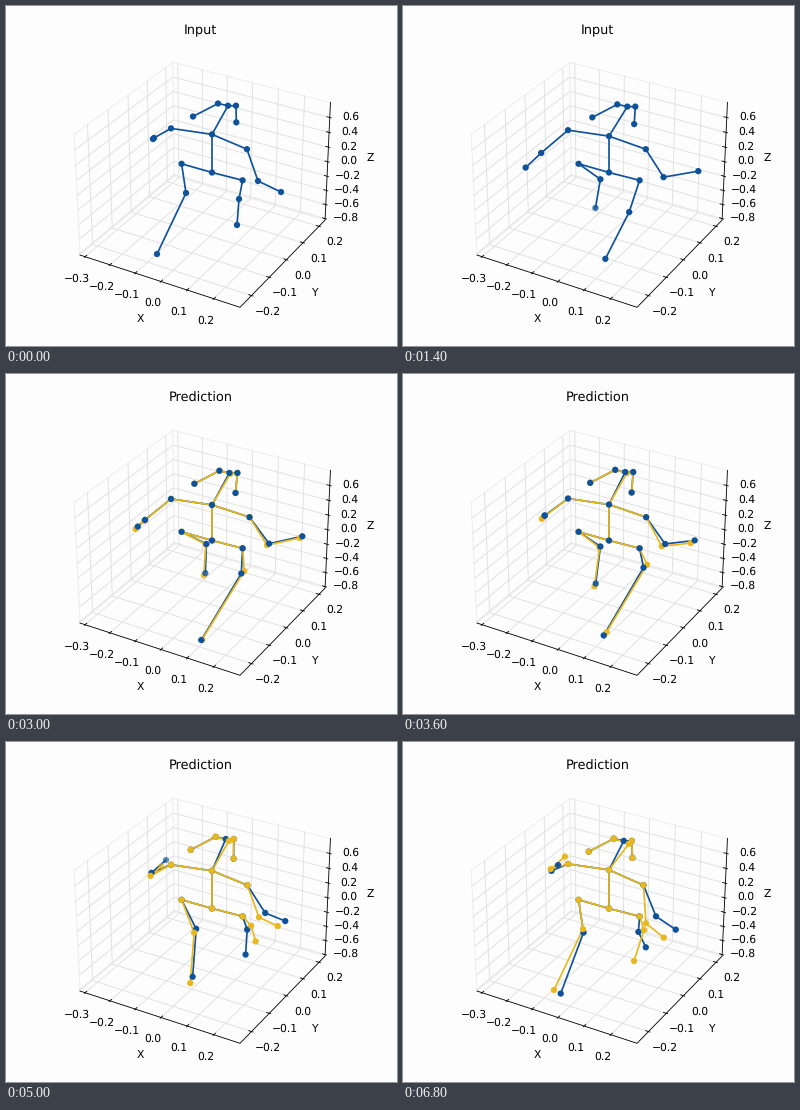
These frames come from a looping animation (391 px wide and 340 px high, 7000 ms). A matplotlib script:

```python
import numpy as np
import matplotlib.pyplot as plt
from matplotlib.animation import FuncAnimation
from matplotlib.colors import to_rgba

W, H, DPI = 391, 340, 100
PT = 72 / DPI  # points per pixel
STEP, FRAMES = 200, 35
PREDICT_AT = 2000
FRONT_SWAP = 5000  # from here the predicted joints lie in front
BG, BLUE, YELLOW = "#fdfdfd", "#0f529c", "#e8b81e"
FONT = 10.7

plt.rcParams["text.hinting"] = "no_hinting"

# Per axis: limits, tick positions
AXES = {
    "x": ((-0.3206, 0.2969), np.arange(-3, 3) / 10),
    "y": ((-0.2624, 0.2389), np.arange(-2, 3) / 10),
    "z": ((-0.821, 0.800), np.arange(-4, 4) / 5),
}

# One walking cycle: each limb joint loops through four key points
CYCLE = 7400
KEYS = np.array([0, 1900, 3700, 5800])
LIMBS = {
    "relbow": [(148, 132), (136, 150), (142, 141), (147, 127)],
    "rwrist": [(147, 133), (119, 166), (143, 140), (164, 112)],
    "lelbow": [(252, 175), (263, 170), (262, 170), (257, 172)],
    "lwrist": [(275, 186), (300, 160), (291, 167), (274, 185)],
    "rknee": [(180, 187), (202, 170), (197, 173), (186, 193)],
    "rankle": [(151, 248), (204, 191), (192, 211), (180, 246)],
    "lknee": [(233, 193), (226, 208), (241, 193), (239, 187)],
    "lankle": [(231, 219), (196, 261), (202, 260), (255, 192)],
}

# The prediction runs ahead in the legs, behind in the right arm,
# and drifts away at these joints
AHEAD = ("rknee", "rankle", "lknee", "lankle")
BEHIND = ("relbow", "rwrist")
DRIFT = {"nose": (5, 3), "lelbow": (-10, 7), "lwrist": (-12, 8),
         "lknee": (8, -5)}

CHAINS = [chain.split() for chain in (
    "rwrist relbow rshoulder neck lshoulder lelbow lwrist",
    "rankle rknee rhip root lhip lknee lankle",
    "root neck nose",
    "rear reye nose leye lear",
)]
JOINTS = list(dict.fromkeys(j for chain in CHAINS for j in chain))


def loop_path(points, t):
    """Smooth closed path through the key points, repeated every cycle."""
    keys = np.concatenate([KEYS - CYCLE, KEYS, KEYS + CYCLE]).astype(float)
    p = np.tile(np.array(points, float), (3, 1))
    slope = np.gradient(p, keys, axis=0)
    t = t % CYCLE
    i = np.searchsorted(keys, t, "right") - 1
    h = keys[i + 1] - keys[i]
    u = (t - keys[i]) / h
    return ((1 + 2 * u) * (1 - u) ** 2 * p[i]
            + u * (1 - u) ** 2 * h * slope[i]
            + u * u * (3 - 2 * u) * p[i + 1]
            + u * u * (u - 1) * h * slope[i + 1])


def wave(t, size, degrees):
    return size * np.cos(2 * np.pi * t / CYCLE - np.radians(degrees))


def observed(t):
    bob = wave(t, 1.6, 130)
    head = np.array([2 + wave(t, 2.5, 90), wave(t, 1.8, 60) - 0.9])
    pose = {
        "root": (206, 166.5), "rhip": (175.6, 157.8), "lhip": (236.6, 174.3),
        "neck": (206, 129.4 + bob),
        "rshoulder": (165, 123.4 + bob),
        "lshoulder": (242 + bob, 143.2),
        "nose": head + (220, 99.7),
        "reye": head + (210, 97.5),
        "rear": head + (185, 110.5),
        "leye": head + (228, 99.7),
        "lear": (229.4 + wave(t, 1.8, 60), 117.4 + bob),
    }
    for name, points in LIMBS.items():
        pose[name] = loop_path(points, t)
    return pose


def predicted(t):
    since = t - PREDICT_AT
    lead, growth = since / 8, since / 4800
    pose, ahead, behind = (observed(t + d) for d in (0, lead, -lead))
    pose.update({j: ahead[j] for j in AHEAD})
    pose.update({j: behind[j] for j in BEHIND})
    for name, offset in DRIFT.items():
        pose[name] = pose[name] + growth * np.array(offset)
    return pose


def project(x, y, z):
    """Perspective view of the box [-1, 1]^3, in pixels."""
    depth = 10 - 0.2577 * x + 0.4464 * y - 0.2232 * z
    right = 0.5155 * x + 0.2976 * y
    up = -0.1488 * x + 0.2577 * y + 0.3866 * z
    return np.array([198.8 + 1540 * right / depth, 173 - 1540 * up / depth])


fig = plt.figure(figsize=(W / 100, H / 100), dpi=DPI, facecolor=BG)
ax = fig.add_axes([0, 0, 1, 1])
ax.set_xlim(0, W)
ax.set_ylim(H, 0)
ax.axis("off")


def segment(*corners, color, width, z=1):
    pts = np.array([project(*c) for c in corners])
    ax.plot(pts[:, 0], pts[:, 1], color=color, lw=width * PT, zorder=z)


def label(x, y, text, size=FONT):
    return ax.text(x, y + 0.365 * size, text, fontsize=size * PT, ha="center",
                   va="baseline", family="DejaVu Sans", color="black")


def draw_box():
    edge = dict(color="#ececec", width=0.9)
    segment((-1, -1, -1), (-1, -1, 1), (-1, 1, 1), (1, 1, 1), **edge)
    segment((-1, -1, -1), (-1, 1, -1), (1, 1, -1), **edge)
    segment((-1, 1, -1), (-1, 1, 1), **edge)

    # For each axis: grid path, tick at distance d from the edge, label offset
    layout = {
        "x": (lambda p: [(p, -1, -1), (p, 1, -1), (p, 1, 1)],
              lambda p, d: (p, -1 - d, -1), (-8, 20.8)),
        "y": (lambda p: [(1, p, -1), (-1, p, -1), (-1, p, 1)],
              lambda p, d: (1 + d, p, -1), (16, 15)),
        "z": (lambda p: [(-1, -1, p), (-1, 1, p), (1, 1, p)],
              lambda p, d: (1 + d, 1, p), (20.7, -1.5)),
    }
    for name, (grid, tick, offset) in layout.items():
        (lo, hi), values = AXES[name]
        for value in values:
            p = 2 * (value - lo) / (hi - lo) - 1
            segment(*grid(p), color="#e0e0e0", width=0.9)
            segment(tick(p, -0.033), tick(p, 0.017),
                    color="black", width=0.86, z=3)
            text = f"{value:.1f}".replace("-", "\u2212")
            label(*(project(*tick(p, 0)) + offset), text)
    segment((-1, -1, -1), (1, -1, -1), (1, 1, -1), (1, 1, 1),
            color="black", width=0.86, z=2)
    label(134, 312, "X")
    label(308, 286, "Y")
    label(364, 151, "Z")


def bump(t, center, width):
    return np.exp(-((t - center) / width) ** 2)


class Skeleton:
    def __init__(self, color, z):
        self.rgba = to_rgba(color)
        self.bones = [ax.plot([], [], color=color, lw=1.7 * PT, zorder=z,
                              solid_joinstyle="round")[0] for _ in CHAINS]
        start = np.zeros(len(JOINTS))
        self.dots = ax.scatter(start, start, s=(6.3 * PT) ** 2,
                               linewidths=0, zorder=6)

    def show(self, pose, t):
        for bone, chain in zip(self.bones, CHAINS):
            bone.set_data(*np.array([pose[j] for j in chain]).T)
        self.dots.set_offsets([pose[j] for j in JOINTS])
        colors = np.tile(self.rgba, (len(JOINTS), 1))
        # Joints that swing far back look paler
        colors[JOINTS.index("rankle"), 3] -= 0.3 * bump(t, 2200, 1300)
        colors[JOINTS.index("rwrist"), 3] -= 0.4 * bump(t, 5200, 1000)
        self.dots.set_facecolor(colors)

    def set_visible(self, on):
        for artist in [*self.bones, self.dots]:
            artist.set_visible(on)


draw_box()
title = label(194.8, 23.6, "Input", size=1.2 * FONT)
truth = Skeleton(BLUE, 4)
guess = Skeleton(YELLOW, 5)


def update(frame):
    t = frame * STEP
    predicting = t >= PREDICT_AT
    title.set_text("Prediction" if predicting else "Input")
    truth.show(observed(t), t)
    guess.set_visible(predicting)
    if predicting:
        guess.show(predicted(t), t)
    guess.dots.set_zorder(7 if t >= FRONT_SWAP else 5.5)
    return []


anim = FuncAnimation(fig, update, frames=FRAMES, interval=STEP,
                     init_func=lambda: update(0), repeat=True, repeat_delay=0)
plt.show()
```
